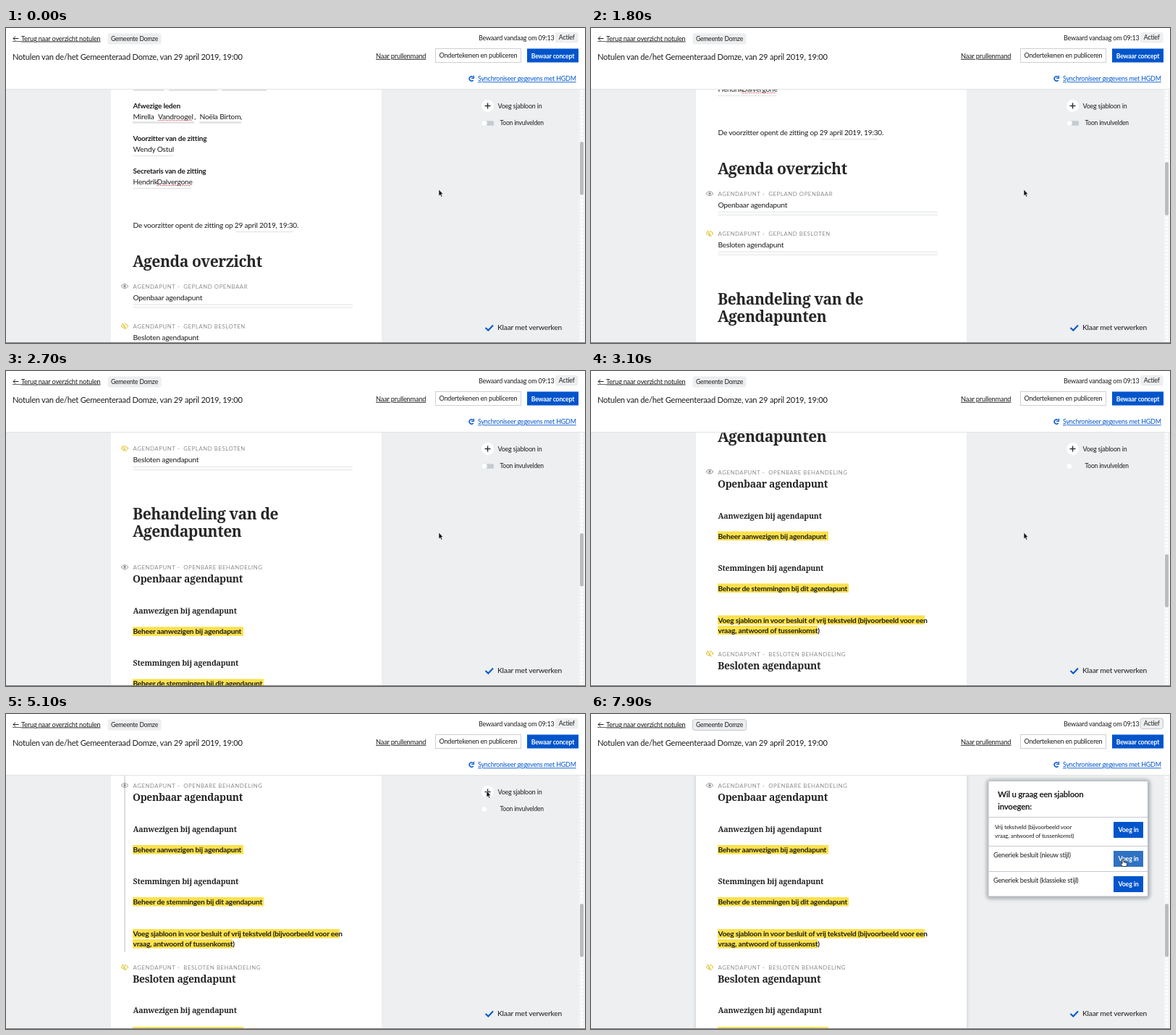
These frames come from a looping animation (800 by 435 pixels, 8 s). An HTML page:

```html
<!DOCTYPE html>
<html lang="nl">
<head>
<meta charset="utf-8">
<title>Notulen</title>
<style>
  html, body { margin: 0; width: 100%; height: 100%; overflow: hidden; background: #fff; }
  svg { display: block; width: 100vw; height: 100vh; }
  text { font-family: Lato, "Open Sans", sans-serif; font-size: 10.2px; letter-spacing: -.02em; fill: #1c1c1c; white-space: pre; }
  .b { font-weight: 700; }
  .u { text-decoration: underline; }
  .m { text-anchor: middle; }
  .w { fill: #fff; }
  .h1, .h2, .h3 { font-family: "Noto Serif", serif; font-weight: 700; fill: #262626; }
  .h1 { font-size: 21px; }
  .h2 { font-size: 13.9px; }
  .h3 { font-size: 10.6px; }
  .label { font-size: 7.8px; letter-spacing: .56px; fill: #8e8e8e; }
  .caption { font-size: 9px; fill: #fff; stroke: #b4b7ba; stroke-width: .7px; paint-order: stroke; }
</style>
</head>
<body>
<svg id="stage" viewBox="0 0 800 435" preserveAspectRatio="none">
  <defs>
    <clipPath id="view"><rect y="85" width="800" height="349"/></clipPath>
    <filter id="glow" x="-10%" y="-10%" width="120%" height="120%"><feGaussianBlur stdDeviation="2.2"/></filter>
  </defs>
</svg>
<script>
const stage = document.getElementById('stage');
const BLUE = '#0055cc';

function add(parent, tag, attrs = {}, content) {
  const node = document.createElementNS('http://www.w3.org/2000/svg', tag);
  for (const key in attrs) node.setAttribute(key, attrs[key]);
  if (content) node.textContent = content;
  parent.append(node);
  return node;
}
const group = (parent, attrs) => add(parent, 'g', attrs);
const rect = (parent, x, y, width, height, fill, more) => add(parent, 'rect', { x, y, width, height, fill, ...more });
const path = (parent, d, stroke, width = 1, more) =>
  add(parent, 'path', { d, stroke, 'stroke-width': width, fill: 'none', ...more });
const text = (parent, x, y, content, cls = '', size) =>
  add(parent, 'text', { x, y, class: cls, ...(size && { style: `font-size:${size}px` }) }, content);
const show = (node, on) => node.setAttribute('visibility', on ? 'visible' : 'hidden');
const move = (node, x, y) => node.setAttribute('transform', `translate(${x} ${y})`);

// Workspace and document
rect(stage, 0, 0, 800, 435, '#fff');
rect(stage, 0, 85, 800, 350, '#edeff0');
const edge = rect(stage, 144, 84, 376, 352, '#c9ccd0', { filter: 'url(#glow)', opacity: .8 });
const view = group(stage, { 'clip-path': 'url(#view)' });
rect(view, 145, 85, 374, 350, '#fff');
const sectionBar = rect(view, 163, 85, 2, 244, '#dcdee0');
const doc = group(view);

const rule = (x1, x2, y, width = 1) => path(doc, `M${x1} ${y}H${x2}`, '#dfe1e2', width);
const misspelt = (x1, x2, y) => path(doc, `M${x1} ${y}H${x2}`, '#d0505a', 1, { 'stroke-dasharray': '1.5 1' });

function label(y, kind, secret) {
  const color = secret ? '#d9b800' : '#8d9196';
  const eye = group(doc, { transform: `translate(164 ${y - 3.5})` });
  path(eye, 'M-5 0Q0-6 5 0Q0 6-5 0Z', color);
  add(eye, 'circle', { r: 1.7, fill: color });
  if (secret) path(eye, 'M-2.5-4.5L3 4.5', '#fff', 2.2), path(eye, 'M-3.2-4L2.3 4.5', color);
  text(doc, 175.5, y, `AGENDAPUNT -\u00a0 ${kind}`, 'label');
}
function marked(y, width, content) {
  rect(doc, 175, y - 10, width, 12.5, '#fce14b');
  text(doc, 175.5, y, content, 'b', 10.1);
}
function planned(y, kind, title, secret) {
  label(y, kind, secret);
  text(doc, 175.5, y + 16, title);
  rule(175.5, 479, y + 22);
  rule(175.5, 479, y + 26);
}

rule(176, 218, 86, 2);
rule(225, 292, 86, 2);
rule(298, 360, 86, 2);
text(doc, 175.5, 111, 'Afwezige leden', 'b', 10);
text(doc, 175.5, 126, 'Mirella');
text(doc, 210, 126, 'Vandroogel');
text(doc, 260, 126, ',');
text(doc, 267.5, 126, 'Noëla Birtom');
text(doc, 324, 126, ',');
misspelt(210, 257, 127.5);
rule(175, 260, 130.5, 2.5);
rule(267, 325, 130.5, 2.5);
text(doc, 175.5, 156, 'Voorzitter van de zitting', 'b', 10);
text(doc, 175.5, 171, 'Wendy Ostul');
rule(175, 231, 176.5);
text(doc, 175.5, 201, 'Secretaris van de zitting', 'b', 10);
text(doc, 175.5, 216, 'Hendrik');
text(doc, 208.5, 216, 'Dalvergone');
misspelt(208, 255, 217.5);
rule(175, 256, 221.5);
text(doc, 175.5, 276, 'De voorzitter opent de zitting op 29 april 2019, 19:30.', '', 10.1);
rule(318, 396, 281.5);

text(doc, 175, 330, 'Agenda overzicht', 'h1');
planned(360, 'GEPLAND OPENBAAR', 'Openbaar agendapunt');
planned(415, 'GEPLAND BESLOTEN', 'Besloten agendapunt', true);
text(doc, 175, 509.5, 'Behandeling van de', 'h1');
text(doc, 175, 534, 'Agendapunten', 'h1');

label(579, 'OPENBARE BEHANDELING');
text(doc, 175, 597, 'Openbaar agendapunt', 'h2');
text(doc, 175.5, 640, 'Aanwezigen bij agendapunt', 'h3');
marked(668, 153, 'Beheer aanwezigen bij agendapunt');
text(doc, 175.5, 712, 'Stemmingen bij agendapunt', 'h3');
marked(740, 181, 'Beheer de stemmingen bij dit agendapunt');
marked(784, 286, 'Voeg sjabloon in voor besluit of vrij tekstveld (bijvoorbeeld voor een');
marked(798, 138, 'vraag, antwoord of tussenkomst)');
label(830, 'BESLOTEN BEHANDELING', true);
text(doc, 175, 848, 'Besloten agendapunt', 'h2');
text(doc, 175.5, 890, 'Aanwezigen bij agendapunt', 'h3');
marked(919, 153, 'Beheer aanwezigen bij agendapunt');

// Header
rect(stage, 0, 0, 800, 84, '#fff');
rect(stage, 0, 84, 800, 1.2, '#e3e5e7');
path(stage, 'M17.5 14.5H10M13 11.5L10 14.5L13 17.5', '#222');
path(stage, 'M9 18.5H21', '#222', .7);
text(stage, 21, 17.5, 'Terug naar overzicht notulen', 'u', 9.2);
const badges = [[140.5, 7.5, 74, 15], [759, 6, 31.5, 14.5]].map(([x, y, w, h]) =>
  rect(stage, x, y, w, h, '#eceef0', { rx: 3 }));
text(stage, 177.5, 18.3, 'Gemeente Domze', 'm', 8.5);
text(stage, 653, 17.2, 'Bewaard vandaag om 09:13', '', 8.95);
text(stage, 774.7, 16.3, 'Actief', 'm', 8.8);
text(stage, 9, 44, 'Notulen van de/het Gemeenteraad Domze, van 29 april 2019, 19:00', '', 11.1);
text(stage, 511, 41.8, 'Naar prullenmand', 'u', 9.25);
rect(stage, 593.5, 28.5, 118, 19, '#fff', { stroke: '#ccd0d4' });
text(stage, 652.5, 41.3, 'Ondertekenen en publiceren', 'm', 9);
rect(stage, 720, 28.5, 71, 19, BLUE);
text(stage, 755.5, 41.5, 'Bewaar concept', 'b m w', 8.7);
path(stage, 'M645.6 72A3.1 3.1 0 1 1 645.2 67.6', BLUE, 1.4);
path(stage, 'M646.4 65.8V69.4H643', BLUE, 1.2);
text(stage, 652, 73.3, 'Synchroniseer gegevens met HGDM', 'u', 8.9).style.fill = BLUE;

// Side tools
add(stage, 'circle', { cx: 665.5, cy: 107.5, r: 8.5, fill: '#fff' });
path(stage, 'M661.5 107.5H669.5M665.5 103.5V111.5', '#333', 1.5);
text(stage, 679.5, 110.8, 'Voeg sjabloon in', '', 8.9);
const switchBody = rect(stage, 659, 128.3, 15, 6.5, '#c5cbd1', { rx: 1.5 });
add(stage, 'circle', { cx: 660.8, cy: 131.5, r: 4, fill: '#fff', stroke: '#d9dcdf', 'stroke-width': .5 });
text(stage, 682.5, 133.8, 'Toon invulvelden', '', 8.5);
path(stage, 'M662.5 414L666.3 417.5L673 410.5', BLUE, 2);
text(stage, 679, 417.3, 'Klaar met verwerken', '', 10.25);

// Scrollbar and window edge
rect(stage, 791.5, 85, 8.5, 349, '#f3f4f5');
path(stage, 'M795.5 86V433', '#fff', 3, { 'stroke-dasharray': '3 2' });
const thumb = rect(stage, 793, 157, 5, 73.5, '#babcbe', { rx: 2.5 });
rect(stage, 0, 434, 800, 1, '#77797b');

const caption = group(stage);
['Klik om de', 'juiste optie', 'selecteren'].forEach((line, i) => text(caption, 529, 297 + 14 * i, line, 'caption'));

// Template picker
const picker = group(stage);
rect(picker, 546, 90, 227, 166, '#9fa4aa', { rx: 6, filter: 'url(#glow)', opacity: .75 });
rect(picker, 549.5, 93, 219.5, 158.5, '#fff', { rx: 1 });
text(picker, 562, 114.5, 'Wil u graag een sjabloon', 'b', 11.4);
text(picker, 562, 131.5, 'invoegen:', 'b', 11.4);
path(picker, 'M549.5 142.5H769M549.5 182.5H769M549.5 217.5H769', '#c6cad0');
text(picker, 558, 159, 'Vrij tekstveld (bijvoorbeeld voor', '', 8);
text(picker, 558, 171.2, 'vraag, antwoord of tussenkomst)', '', 8);
text(picker, 556, 198.3, 'Generiek besluit (nieuw stijl)', '', 9.1);
text(picker, 556, 233.3, 'Generiek besluit (klassieke stijl)', '', 9.1);
const buttons = [149, 189, 224].map(y => {
  const face = rect(picker, 722, y, 41, 22, BLUE);
  text(picker, 742.5, y + 14.2, 'Voeg in', 'b m w', 8.9);
  return face;
});

// Pointers, hot spot at 0,0
const arrow = group(stage);
add(arrow, 'path', { d: 'M0 0V9L2 7.2L3.4 10.3L4.8 9.6L3.5 6.6H6Z', fill: '#111', stroke: '#fff', 'stroke-width': .6 });
const hand = group(stage);
add(hand, 'path', {
  d: 'M-1 0Q0-1 1 0V3.5L5 4.5Q6 5 5.6 6.5L4.8 9.5H-.5L-3.4 5.8Q-3.2 4.4-1 5.8Z',
  fill: '#fff', stroke: '#111', 'stroke-width': .8
});

const smooth = p => p * p * (3 - 2 * p);
// Rows are [time, ...values]; values ease between neighbouring rows.
function along(keys, t) {
  const i = keys.findIndex(k => k[0] > t);
  if (i < 0) return keys[keys.length - 1].slice(1);
  if (i === 0) return keys[0].slice(1);
  const [a, b] = [keys[i - 1], keys[i]];
  const p = smooth((t - a[0]) / (b[0] - a[0]));
  return a.slice(1).map((v, n) => v + (b[n + 1] - v) * p);
}

const SCROLL = [[0, 0], [700, 116], [1700, 118], [2400, 296], [2650, 300], [3100, 436.5], [3600, 477]];
const POINTER = [[3600, 598, 223], [4100, 420, 305], [4600, 420, 305], [5100, 664, 106],
  [5400, 664, 106], [6300, 640, 222], [6500, 640, 222], [7200, 735, 201]];
const OPEN = 5200, HOVER = 7100;

function draw(t) {
  const [scroll] = along(SCROLL, t);
  move(doc, 0, -scroll);
  thumb.setAttribute('y', 157 + scroll * .22);

  const open = t >= OPEN;
  show(picker, open);
  show(edge, open);
  badges.forEach(badge => badge.setAttribute('stroke', open ? '#c4c8cd' : 'none'));
  show(switchBody, t < 2800);
  show(sectionBar, t >= 4000 && !open);
  caption.setAttribute('opacity', along([[4000, 0], [4200, 1], [4800, 1], [5100, 0]], t)[0]);

  const [x, y] = along(POINTER, t);
  const hover = t >= HOVER;
  move(arrow, x, y);
  move(hand, x, y);
  show(arrow, !hover && (t < 4000 || t > 4600));
  show(hand, hover);
  buttons[1].setAttribute('fill', hover ? '#2f72c4' : BLUE);
}

const start = performance.now();
function tick() {
  const t = (performance.now() - start) % 8000;
  draw(Math.floor(t / 100) * 100);
  requestAnimationFrame(tick);
}
tick();
</script>
</body>
</html>
```
